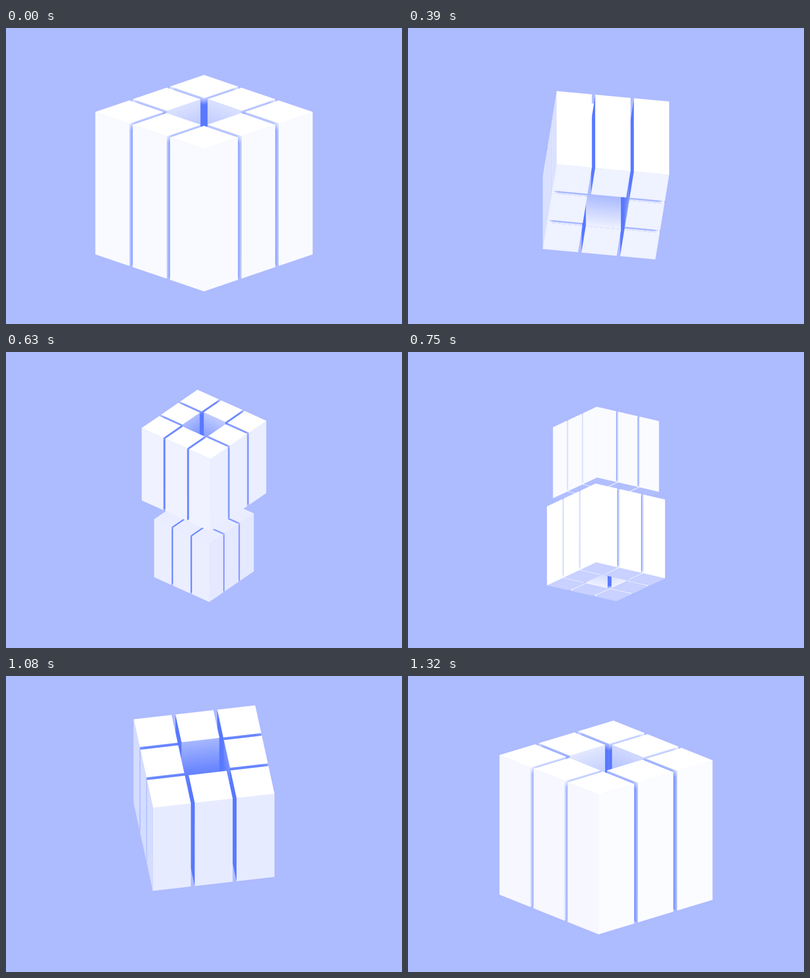
An HTML page with a canvas for the animation above (1350 ms loop, 800 by 600 pixels).

```html
<!DOCTYPE html>
<html lang="en">
<head>
<meta charset="utf-8">
<title>Turning columns</title>
<style>
  html, body { margin: 0; width: 100%; height: 100%; overflow: hidden; background: #adbbff; }
  canvas { display: block; }
</style>
</head>
<body>
<canvas id="stage" width="800" height="600"></canvas>
<script>
const ctx = document.getElementById('stage').getContext('2d');
const LOOP = 1350, STEP = 30;
const PITCH = 0.3443, HALF = 0.1558, HALF_HEIGHT = 0.495; // column grid, relative to cube size
const DEEP = '#5878ff';

// time, extra tilt in degrees, lift on screen, distance between the two cubes
const KEYS = [
  [0, 0, -14.5, 0], [180, 0, -9.5, 40], [390, 0, 17.9, 125], [540, 2, 44, 190],
  [630, 4.9, 45.6, 207], [870, 10, 46, 140], [1080, 7.6, 11.4, 75], [1320, 0, -14.5, 10], [1350, 0, -14.5, 0]
];

function slope(i, col) {
  if (i === 0 || i === KEYS.length - 1) return 0;
  return (KEYS[i + 1][col] - KEYS[i - 1][col]) / (KEYS[i + 1][0] - KEYS[i - 1][0]);
}

function track(t, col) {
  let i = 0;
  while (i < KEYS.length - 2 && t >= KEYS[i + 1][0]) i++;
  const a = KEYS[i], b = KEYS[i + 1], d = b[0] - a[0], x = (t - a[0]) / d, y = 1 - x;
  return y * y * (1 + 2 * x) * a[col] + x * x * (3 - 2 * x) * b[col]
    + d * x * y * (y * slope(i, col) - x * slope(i + 1, col));
}

const clamp = (v, lo, hi) => Math.min(hi, Math.max(lo, v));
const add = (p, v, k) => [p[0] + v[0] * k, p[1] + v[1] * k];

// Screen x, screen y (down) and nearness of the three cube axes
function axes(yaw, tilt) {
  const c = Math.cos(yaw), s = Math.sin(yaw), C = Math.cos(tilt), S = Math.sin(tilt);
  return [[c, s * S, s * C], [0, -C, S], [-s, c * S, c * C]];
}

const brightness = n => clamp(208.8 + 75 * n[2] - 40 * n[1], 200, 255);
const tint = (v, alpha = 1) => `rgba(${v},${255 - (255 - v) * 0.83},255,${alpha})`;

// Gradient running from an edge, square to it, as far as "reach" goes inward
function fade(from, edge, reach, v, near, far) {
  const k = (reach[0] * edge[0] + reach[1] * edge[1]) / (edge[0] ** 2 + edge[1] ** 2 || 1);
  const to = add(add(from, reach, 1), edge, -k);
  const g = ctx.createLinearGradient(from[0], from[1], to[0], to[1]);
  g.addColorStop(0, tint(v, near));
  g.addColorStop(1, tint(v, far));
  return g;
}

function drawColumn(center, cell, size, basis, dim) {
  const half = [HALF * size, HALF_HEIGHT * size, HALF * size];
  const cap = Math.sign(basis[1][2]) || 1;
  for (const n of [0, 1, 2]) {
    const sign = Math.sign(basis[n][2]);
    if (!sign) continue;
    const normal = basis[n].map(v => v * sign);
    const a = n === 1 ? 0 : 1, b = n === 1 ? 2 : 2 - n;
    const mid = add(center, normal, half[n]);
    ctx.beginPath();
    for (const [i, j] of [[-1, -1], [1, -1], [1, 1], [-1, 1]])
      ctx.lineTo(...add(add(mid, basis[a], i * half[a]), basis[b], j * half[b]));
    ctx.closePath();

    let v = brightness(normal);
    if (n === 1 || cell[n] === sign) {
      v -= n === 1 ? dim * 22 : dim * 5;
      ctx.fillStyle = ctx.strokeStyle = tint(v);
      ctx.lineWidth = 0.6;
      ctx.fill();
      ctx.stroke();
      continue;
    }

    ctx.fillStyle = DEEP;
    ctx.fill();
    const lit = (v - 200) / 55;
    const facesHole = cell[n] + sign === 0 && cell[b] === 0;
    const depth = size * (facesHole ? 0.42 : 0.05);
    const rim = facesHole ? 0.1 + 0.8 * lit : lit ** 3;
    ctx.fillStyle = fade(add(mid, basis[1], cap * half[1]), basis[b],
      basis[1].map(x => -cap * x * depth), v, rim, facesHole ? Math.max(0, lit - 0.5) : 0);
    ctx.fill();
    if (!facesHole) {
      ctx.fillStyle = fade(add(mid, basis[b], cell[b] * half[b]), basis[1],
        basis[b].map(x => -cell[b] * x * depth), v, rim, 0);
      ctx.fill();
    }
  }
}

function drawCube(size, y, basis, dim) {
  if (size < 8) return;
  const cells = [];
  for (const i of [-1, 0, 1])
    for (const k of [-1, 0, 1])
      if (i || k) cells.push([i, 0, k]);
  const nearness = c => c[0] * basis[0][2] + c[2] * basis[2][2];
  cells.sort((p, q) => nearness(p) - nearness(q));
  for (const c of cells) {
    const center = add(add([400, y], basis[0], c[0] * PITCH * size), basis[2], c[2] * PITCH * size);
    drawColumn(center, c, size, basis, dim);
  }
}

function draw(t) {
  const rad = Math.PI / 180;
  const turn = 180 * (1 - Math.cos(Math.PI * t / LOOP)) + track(t, 1);
  const basis = axes((45 - 180 * t / LOOP) * rad, (20 - turn) * rad);
  const lift = track(t, 2), gap = track(t, 3);
  const cubes = [
    { size: 309.9 - 0.2087 * t, shift: -0.2 * gap },
    { size: 0.2347 * (t - 22), shift: 0.8 * gap }
  ].sort((p, q) => p.size - q.size);

  ctx.fillStyle = '#adbbff';
  ctx.fillRect(0, 0, 800, 600);
  cubes.forEach((c, i) => drawCube(c.size, 300 - lift + c.shift * basis[1][1], basis, 1 - i));
}

const start = performance.now();
function tick() {
  const t = (performance.now() - start) % LOOP;
  draw(Math.floor(t / STEP) * STEP);
  requestAnimationFrame(tick);
}
tick();
</script>
</body>
</html>
```
